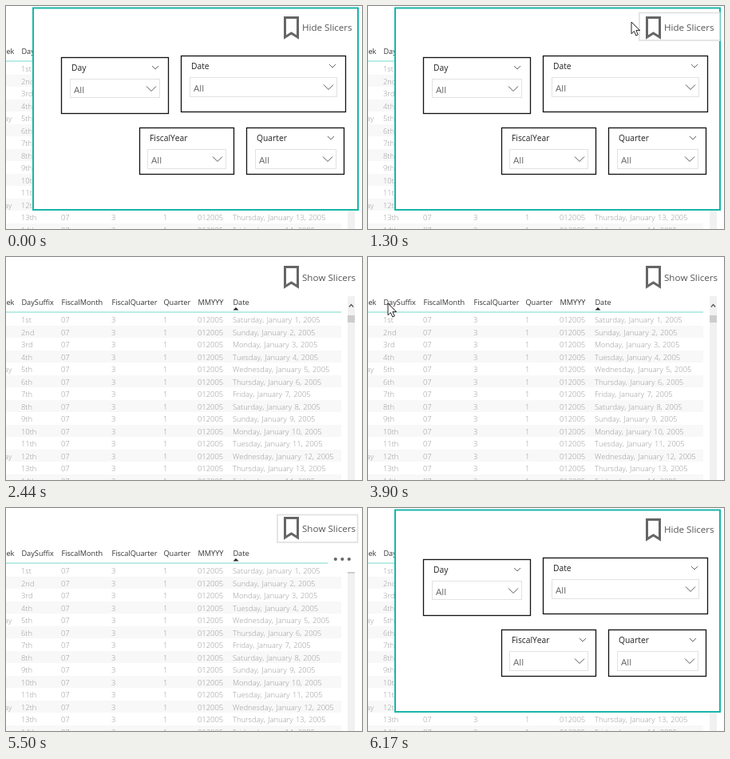
These frames come from a looping animation (446 px wide and 279 px high, 8 s). An HTML page with a canvas:

```html
<!DOCTYPE html>
<html lang="en">
<head>
<meta charset="utf-8">
<title>Slicer panel toggle</title>
<style>
html, body { margin: 0; width: 100%; height: 100%; overflow: hidden; background: #fff; }
canvas { display: block; }
</style>
</head>
<body>
<canvas id="stage" width="446" height="279"></canvas>
<script>
const ctx = document.getElementById('stage').getContext('2d');
const LOOP = 8000;
const TEAL = '#18b5aa';
const DAYS = ['Sunday', 'Monday', 'Tuesday', 'Wednesday', 'Thursday', 'Friday', 'Saturday'];
const COLUMNS = [
  ['ek', 0], ['DaySuffix', 19], ['FiscalMonth', 69], ['FiscalQuarter', 132],
  ['Quarter', 197], ['MMYYY', 240], ['Date', 284]
];
// title, box x, y, w, h, dropdown x, y, w, h
const SLICERS = [
  ['Day', 69, 64, 135, 71, 80, 91, 113, 24],
  ['Date', 219, 62, 207, 71, 230, 89, 185, 25],
  ['FiscalYear', 167, 152, 119, 59, 177, 179, 99, 25],
  ['Quarter', 301, 152, 123, 59, 312, 179, 102, 25]
];
// time, x, y
const VISITS = [
  [[500, 28, 60], [900, 333, 18], [1060, 352, 18], [1140, 352, 18], [1300, 330, 20], [1720, 330, 20], [2400, -20, 60]],
  [[3900, 25, 58], [4440, 349, 17], [4500, 352, 18], [4640, 352, 18]]
];

ctx.fontKerning = 'none';

const clamp = v => Math.max(0, Math.min(1, v));
const within = (t, from, to) => t >= from && t < to;

function rect(x, y, w, h, color) {
  ctx.fillStyle = color;
  ctx.fillRect(x, y, w, h);
}

function frame(x, y, w, h, color, width = 1) {
  ctx.strokeStyle = color;
  ctx.lineWidth = width;
  ctx.strokeRect(x, y, w, h);
}

function text(str, x, y, size, color, weight = 400) {
  ctx.font = `${weight} ${size}px "Open Sans", "Noto Sans", sans-serif`;
  ctx.fillStyle = color;
  ctx.fillText(str, x, y);
}

function chevron(x, y, half, color) {
  ctx.beginPath();
  ctx.moveTo(x - half, y - half / 2);
  ctx.lineTo(x, y + half / 2);
  ctx.lineTo(x + half, y - half / 2);
  ctx.strokeStyle = color;
  ctx.lineWidth = 1;
  ctx.stroke();
}

function dots(x, y) {
  ctx.fillStyle = '#666';
  for (let i = -1; i <= 1; i++) {
    ctx.beginPath();
    ctx.arc(x + i * 8.5, y, 2.1, 0, Math.PI * 2);
    ctx.fill();
  }
}

function shape(path, x, y, fill, stroke, width, scale = 1) {
  ctx.save();
  ctx.translate(x, y);
  ctx.scale(scale, scale);
  const p = new Path2D(path);
  ctx.lineWidth = width;
  ctx.strokeStyle = stroke;
  if (fill) { ctx.fillStyle = fill; ctx.fill(p); }
  ctx.stroke(p);
  ctx.restore();
}

function button(label, y, baseline, hover) {
  if (hover) {
    rect(339, 8, 102, 36, '#fff');
    frame(340, 8.5, 100.5, 34.5, '#e1e1e1', 1.7);
  }
  shape('M1.5 1.5H17.5V26L9.5 21 1.5 26Z', 348, y, null, '#666', 3);
  text(label, 371, baseline, 11.6, '#555');
}

function ordinal(n) {
  const suffix = n > 10 && n < 14 ? 'th' : ['th', 'st', 'nd', 'rd'][n % 10] || 'th';
  return n + suffix;
}

function table(showMenu) {
  ctx.wordSpacing = '1px';
  for (let n = 1; n <= 14; n++) {
    const y = 82 + (n - 1) * 15.5;
    if (n % 2 === 0) rect(0, Math.round(y - 11.5), 420, 15, '#f8f8f8');
    const day = DAYS[(n + 5) % 7];
    const cells = [day === 'Wednesday' ? 'ay' : '', ordinal(n), '07', '3', '1', '012005', `${day}, January ${n}, 2005`];
    cells.forEach((cell, i) => text(cell, i ? COLUMNS[i][1] : -2, y, 9.4, '#999', 300));
  }
  ctx.wordSpacing = '0px';
  for (const [name, x] of COLUMNS) text(name, x + .4, 60, 9.2, '#333');
  rect(0, 68.5, 420, 1, '#79d8cb');
  ctx.fillStyle = '#222';
  ctx.beginPath();
  ctx.moveTo(284.5, 66.5);
  ctx.lineTo(288, 63);
  ctx.lineTo(291.5, 66.5);
  ctx.fill();

  rect(428, 49, 9, 230, '#f1f1f1');
  rect(428, 73, 9, 9, '#cdcdcd');
  shape('M-2.7 1.5L0 -1.5 2.7 1.5', 432.5, 61, null, '#555', 1.2);
  if (showMenu) {
    rect(403, 48, 40, 32, '#fff');
    dots(421.3, 64);
  }
}

function panel(t) {
  rect(33, 1, 410, 255, '#fff');
  frame(34, 2.5, 407, 252.5, TEAL, 2);
  for (const [title, x, y, w, h, dx, dy, dw, dh] of SLICERS) {
    frame(x + .5, y + .5, w - 1, h - 1, '#111', 1.3);
    text(title, x + 13, y + 17, 10.3, '#222');
    if (title !== 'FiscalYear' || t > 5500) chevron(x + w - 17, y + 13, 4, '#666');
    frame(dx + .5, dy + .5, dw - 1, dh - 1, '#e2e2e2');
    text('All', dx + 5, dy + 18, 11.6, '#666');
    chevron(dx + dw - 11, dy + 12.5, 6, '#555');
  }
  button('Hide Slicers', 13, 31, within(t, 1030, 1500));
}

function pointer(t) {
  const path = VISITS.find(p => within(t, p[0][0], p[p.length - 1][0]));
  if (!path) return;
  const i = path.findIndex(k => k[0] > t);
  const [t0, x0, y0] = path[i - 1], [t1, x1, y1] = path[i];
  const k = (t - t0) / (t1 - t0);
  const ease = k * k * (3 - 2 * k);
  const x = x0 + (x1 - x0) * ease, y = y0 + (y1 - y0) * ease;
  if (x > 341) {
    shape('M5 13V2Q6.5 -1 8 2V8Q10 6.5 11 9 13 7.5 14 10 17 9 17 12V16L15 22H7L1 14Q0 11 3 12Z', x, y, '#fff', '#111', 1.1, .95);
    shape('M8 8V12M11 9V12M14 10V13', x, y, null, '#111', 1, .95);
  } else {
    shape('M0 0V16L3.7 12.5 6.3 18.5 9 17.3 6.4 11.5H11.5Z', x, y, '#fff', '#111', 1, .92);
  }
}

function panelOpacity(t) {
  if (t < 1640 || t >= 6170) return 1;
  return t < 5510 ? 0 : Math.min(.95, (t - 5510) / 260);
}

function draw(t) {
  rect(0, 0, 446, 279, '#fff');
  table(within(t, 5170, 6170));
  if (t >= 1640) {
    ctx.globalAlpha = clamp((t - 1640) / 600);
    button('Show Slicers', 11, 30, within(t, 4400, 6170));
  }
  ctx.globalAlpha = panelOpacity(t);
  if (ctx.globalAlpha > 0) panel(t);
  ctx.globalAlpha = 1;
  if (within(t, 570, 1300)) dots(427.5, 279);
  pointer(t);
}

function tick() {
  draw(performance.now() % LOOP);
  requestAnimationFrame(tick);
}
tick();
</script>
</body>
</html>
```
